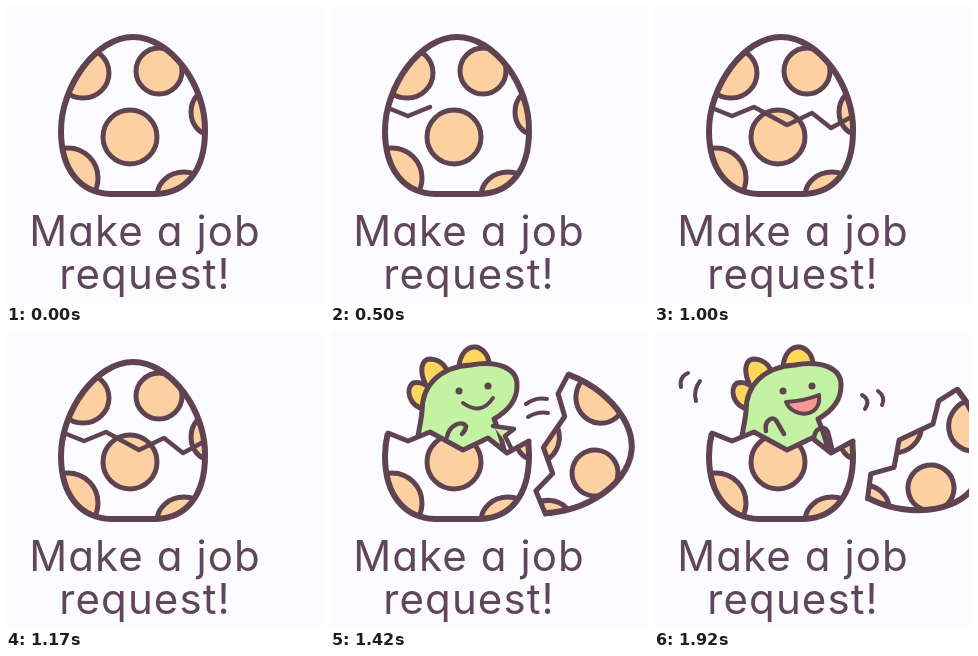
An HTML page for the animation above (2.01 s loop, 318x297 px).

```html
<!DOCTYPE html>
<html lang="en">
<head>
<meta charset="utf-8">
<title>Make a job request!</title>
<style>
html, body { margin: 0; width: 100%; height: 100%; overflow: hidden; background: #fcfcff; }
svg { display: block; width: 100vw; height: 100vh; }
text {
  font: 400 42px Inter, "Open Sans", sans-serif;
  font-feature-settings: "cv11";
  letter-spacing: 1.1px;
  text-anchor: middle;
  fill: #60465a;
  stroke: none;
}
.ink { fill: none; stroke: #5f4350; stroke-width: 5; stroke-linecap: round; stroke-linejoin: round; }
.spot { fill: #fcd0a0; }
.white { fill: #fcfcff; }
.green { fill: #c3f3a2; }
.yellow { fill: #fcd75c; }
.dark { fill: #5f4350; stroke: none; }
</style>
</head>
<body>
<svg viewBox="0 0 318 297" class="ink">
  <defs>
    <path id="outline" d="M127 31C165 31 200 80 199 125C199 165 180 187 150 188H105C75 187 55 165 55 125C55 80 90 31 127 31Z"/>
    <clipPath id="inside"><use href="#outline"/></clipPath>
    <clipPath id="above"><polygon id="abovePoly"/></clipPath>
    <clipPath id="below"><polygon id="belowPoly"/></clipPath>
    <clipPath id="stage"><path d="M0 0H315V297H0Z"/></clipPath>
    <g id="egg">
      <use href="#outline" class="white" stroke="none"/>
      <g clip-path="url(#inside)" class="spot">
        <ellipse cx="77" cy="67" rx="26" ry="25"/>
        <circle cx="153" cy="65" r="23"/>
        <ellipse cx="203" cy="106" rx="18" ry="22"/>
        <circle cx="124" cy="131" r="27"/>
        <ellipse cx="62" cy="172" rx="30" ry="30"/>
        <ellipse cx="178" cy="190" rx="27" ry="24"/>
      </g>
      <use href="#outline" stroke-width="6"/>
    </g>
  </defs>

  <use id="whole" href="#egg"/>

  <g id="hatched">
    <g id="dino">
      <g class="yellow">
        <path d="M94 78C79 75 75 58 83 52C90 50 98 54 102 60"/>
        <path d="M95 52C89 39 92 29 99 28C108 28 115 33 118 42"/>
        <path d="M129 36C130 22 138 15 146 16C154 18 159 25 159 34"/>
      </g>
      <path class="green" d="M85 130C86 108 91 94 92 80C92 54 110 36 141 34C167 29 188 37 187 55C187 70 178 80 164 88C168 98 173 108 176 130Z"/>
      <g class="dark"><circle cx="129" cy="60" r="3.5"/><circle cx="158" cy="55" r="3.5"/></g>
      <g id="calm">
        <path d="M133 72Q151 85 163 67" stroke-width="4"/>
        <path d="M117 106C119 94 132 89 136 95Q136 99 132 103" stroke-width="4.5"/>
        <path class="green" d="M163 95L184 98L175 105L181 117" stroke-width="4.5"/>
      </g>
      <g id="happy">
        <path d="M132 71Q150 70 165 64C168 87 139 88 132 71Z" fill="#f49a92" stroke-width="4"/>
        <path d="M112 100C110 90 119 83 123 91L130 103" stroke-width="4.5"/>
        <path d="M160 109C160 97 170 93 174 101L178 117" stroke-width="4.5"/>
      </g>
    </g>
    <use href="#egg" clip-path="url(#below)"/>
    <polyline class="crack"/>
    <g clip-path="url(#stage)">
      <g id="cap">
        <use href="#egg" clip-path="url(#above)"/>
        <polyline class="crack"/>
      </g>
    </g>
  </g>

  <polyline id="split" stroke-width="4.5"/>
  <path id="whoosh" d="M196 73Q206 66 217 68M198 86Q208 80 218 82" stroke-width="4"/>
  <g id="cheer" stroke-width="4">
    <path id="leftCheer" d="M34 42Q25 46 27 56M46 50Q39 59 42 70"/>
    <path id="rightCheer" d="M208 64Q217 69 211 78M224 60Q232 66 228 74"/>
  </g>

  <text x="139" y="240">Make a job</text>
  <text x="139" y="283">request!</text>
</svg>
<script>
const LOOP = 2010, STEPS = 24, HATCH = 15;
const crack = [[58, 102], [78, 110], [100, 101], [133, 119], [158, 107], [177, 122], [199, 110]];
// Cap poses: pivot x, pivot y, turn in degrees
const capPoses = [[180, 50, 20], [235, 85, 60], [265, 142, 96], [273, 151, 116], [277, 157, 126]];

const $ = id => document.getElementById(id);
const setPoints = (el, pts) => el.setAttribute("points", pts.join(" "));
const move = (id, x, y) => $(id).setAttribute("transform", `translate(${x} ${y})`);
const show = (id, on) => { $(id).style.display = on ? "" : "none"; };

setPoints($("abovePoly"), [[40, 102], ...crack, [215, 110], [215, 15], [40, 15]]);
setPoints($("belowPoly"), [[40, 102], ...crack, [215, 110], [215, 205], [40, 205]]);
document.querySelectorAll(".crack").forEach(el => setPoints(el, crack));

function draw(now) {
  const step = Math.floor((now % LOOP + 12) * STEPS / LOOP) % STEPS;
  const open = step >= HATCH;
  const happy = step >= 19;

  show("whole", !open);
  show("hatched", open);
  show("split", !open && step > 4);
  setPoints($("split"), crack.slice(0, Math.max(0, step - 4) + 1));

  const [x, y, turn] = capPoses[Math.min(Math.max(step - HATCH, 0), capPoses.length - 1)];
  $("cap").setAttribute("transform", `translate(${x} ${y}) rotate(${turn}) translate(-153 -65)`);
  move("dino", 0, step === HATCH ? 18 : 0);
  show("calm", !happy);
  show("happy", happy);
  show("whoosh", step === 17);

  const inset = step === 21 ? 4 : 0;
  show("cheer", step >= 21);
  move("leftCheer", inset, 0);
  move("rightCheer", -inset, 0);
}

const start = performance.now();
function tick() {
  draw(performance.now() - start);
  requestAnimationFrame(tick);
}
tick();
</script>
</body>
</html>
```
